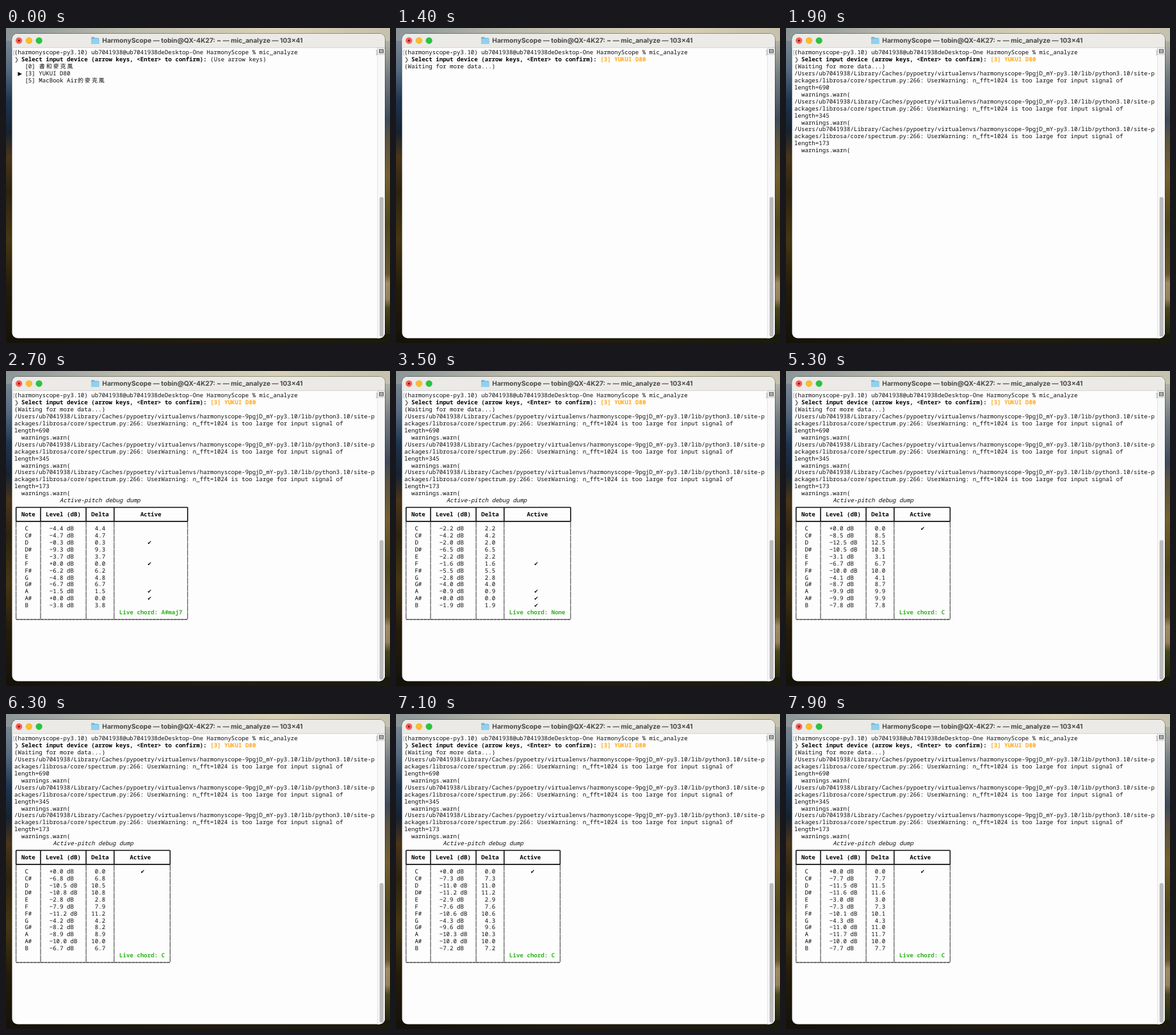
These frames come from a looping animation (600 px wide and 492 px high, 8000 ms). An HTML page:

```html
<!DOCTYPE html>
<html lang="en">
<head>
<meta charset="utf-8">
<title>Terminal: mic_analyze</title>
<style>
  html, body { margin: 0; width: 100%; height: 100%; overflow: hidden; background: #17140c; }
  svg { display: block; width: 600px; height: 492px; }
  text { white-space: pre; text-rendering: geometricPrecision; }
  #screen text { font: 500 9.117px "Noto Sans Mono", "DejaVu Sans Mono", monospace; fill: #0c0c0c; }
  #screen .bold { font-weight: 700; fill: #000; }
  #screen .italic { font-style: italic; }
  #screen .faint { fill: #6e6e6e; }
  #screen .mark { fill: #9a9a9a; font-weight: 400; }
  #screen .answer { font-weight: 700; fill: #ffa81c; }
  #screen .chord { font-weight: 700; fill: #2fb41d; }
  #screen .cjk { font: 500 9px "Noto Sans CJK TC", "Noto Sans CJK", sans-serif; letter-spacing: 1.94px; }
  #screen .symbol { font: 8.5px "DejaVu Sans", sans-serif; }
  .title { font: 700 10.2px Inter, sans-serif; fill: #484846; text-anchor: middle; }
  .thin { stroke: #333; stroke-width: 1; stroke-dasharray: 10.3 .64; }
  .rule { stroke: #222; stroke-width: 1.1; stroke-dasharray: 5 .47; }
  .heavy { stroke: #111; stroke-width: 1.6; }
</style>
</head>
<body>
<svg viewBox="0 0 600 492">
  <defs>
    <linearGradient id="sky">
      <stop stop-color="#8c9698"/><stop offset=".3" stop-color="#b9b9ab"/>
      <stop offset=".7" stop-color="#d8d1b7"/><stop offset="1" stop-color="#c6c1ad"/>
    </linearGradient>
    <linearGradient id="left" x2="0" y2="1">
      <stop stop-color="#87939a"/><stop offset=".13" stop-color="#576b80"/>
      <stop offset=".23" stop-color="#1f3550"/><stop offset=".33" stop-color="#172230"/>
      <stop offset=".41" stop-color="#49351a"/><stop offset=".52" stop-color="#2c2310"/>
      <stop offset=".67" stop-color="#463712"/><stop offset=".82" stop-color="#241c0b"/>
      <stop offset="1" stop-color="#15120a"/>
    </linearGradient>
    <linearGradient id="right" x2="0" y2="1">
      <stop stop-color="#c9c6b3"/><stop offset=".15" stop-color="#737d82"/>
      <stop offset=".29" stop-color="#3d4a5b"/><stop offset=".35" stop-color="#5a5340"/>
      <stop offset=".47" stop-color="#75602d"/><stop offset=".62" stop-color="#50461a"/>
      <stop offset=".78" stop-color="#66562a"/><stop offset=".81" stop-color="#a08a62"/>
      <stop offset=".86" stop-color="#97815a"/><stop offset=".89" stop-color="#484719"/>
      <stop offset="1" stop-color="#1a1a0d"/>
    </linearGradient>
    <linearGradient id="ground">
      <stop stop-color="#15120a"/><stop offset=".5" stop-color="#211b0e"/>
      <stop offset="1" stop-color="#1a1a0d"/>
    </linearGradient>
    <clipPath id="frame"><rect x="9.5" y="9" width="582.5" height="475.5" rx="8.5"/></clipPath>
  </defs>

  <rect width="300" height="492" fill="url(#left)"/>
  <rect x="300" width="300" height="492" fill="url(#right)"/>
  <rect width="600" height="20" fill="url(#sky)"/>
  <rect y="478" width="600" height="14" fill="url(#ground)"/>
  <rect x="9" y="8.5" width="583.5" height="476.5" rx="9" fill="none" stroke="#000" stroke-opacity=".3"/>

  <g clip-path="url(#frame)">
    <rect x="9" y="9" width="584" height="476" fill="#fdfdfd"/>
    <rect x="9" y="9" width="584" height="22" fill="#ebeae6"/>
    <path d="M9 30.7H593" stroke="#d2d1cd" stroke-width=".8"/>
    <rect x="580.5" y="31" width="12" height="454" fill="#f8f8f8"/>
    <path d="M580.5 31V485" stroke="#e4e4e4"/>
    <rect x="583.7" y="264" width="6.2" height="218" rx="3.1" fill="#bcbcbc"/>
    <rect x="581" y="31" width="11" height="10.5" fill="#f4f4f4" stroke="#c4c4c4" stroke-width=".7"/>
    <rect x="583.5" y="33.5" width="6" height="5.5" fill="none" stroke="#444" stroke-width=".9"/>
    <path d="M584 35.3H589M584 37.2H589" stroke="#444" stroke-width=".8"/>
  </g>

  <g stroke-width=".5">
    <circle cx="20.2" cy="19.7" r="4.8" fill="#fe5f57" stroke="#df4740"/>
    <circle cx="35.9" cy="19.7" r="4.8" fill="#febc2e" stroke="#dda023"/>
    <circle cx="51.6" cy="19.7" r="4.8" fill="#29c53f" stroke="#1fa630"/>
    <circle cx="20.2" cy="19.7" r="1.6" fill="#7d1511"/>
  </g>
  <path d="M133 15.5q0-1.5 1.5-1.5h3l1.5 1.4h5q1.5 0 1.5 1.5v6.6q0 1.5-1.5 1.5h-9.5q-1.5 0-1.5-1.5z" fill="#6fb8dd"/>
  <rect x="133" y="16.8" width="12.5" height="8.2" rx="1.4" fill="#92d0ee"/>
  <text class="title" x="307" y="23.3">HarmonyScope — tobin@QX-4K27: ~ — mic_analyze — 103×41</text>
  <g id="screen"></g>
</svg>

<script>
const LOOP = 8000, CELL = 5.47, LINE = 10.94, LEFT = 13, TOP = 38;
const ANSWERED = 600, WAITING = 900, WARNED = 1900, LISTENING = 2100;
const USER = "ub7041938";
const NOTES = ["C", "C#", "D", "D#", "E", "F", "F#", "G", "G#", "A", "A#", "B"];
const ACTIVE_LIMIT = 2;
const readings = [
  { at: 2700, chord: "A#maj7", drop: [4.4, 4.7, .3, 9.3, 3.7, 0, 6.2, 4.8, 6.7, 1.5, 0, 3.8] },
  { at: 4300, chord: "None", drop: [0, 3.7, 3.8, 3.7, .7, 3.2, 4.8, .8, 1.4, .4, 0, 0] },
  { at: 5300, chord: "C", drop: [0, 8.5, 12.5, 10.5, 3.1, 6.7, 10, 4.1, 8.7, 9.9, 9.9, 7.8] },
  { at: 6300, chord: "C", drop: [0, 6.8, 10.5, 10.8, 2.8, 7.9, 11.2, 4.2, 8.2, 8.9, 10, 6.7] },
  { at: 7900, chord: "C", drop: [0, 7.7, 11.5, 11.6, 3, 7.3, 10.1, 4.3, 11, 11.7, 10, 7.7] },
];

const screen = document.getElementById("screen");
const colX = col => LEFT + col * CELL;
const rowY = row => TOP + row * LINE;
const escapeText = s => s.replace(/&/g, "&amp;").replace(/</g, "&lt;");
const put = (col, row, text, style = "") =>
  `<text class="${style}" x="${colX(col)}" y="${rowY(row) + 3.1}">${escapeText(text)}</text>`;
const line = (x1, y1, x2, y2, style) =>
  `<path class="${style}" d="M${x1} ${y1}L${x2} ${y2}"/>`;
const centred = (col, width, row, text, style) =>
  put(col + Math.floor((width - text.length) / 2), row, text, style);

function prompt() {
  return put(-.65, 0, "[", "mark") + put(103, 0, "]", "mark") +
    put(0, 0, `(harmonyscope-py3.10) ${USER}@${USER}deDesktop-One HarmonyScope % mic_analyze`) +
    put(0, 1, "❯", "faint symbol") +
    put(2, 1, "Select input device (arrow keys, <Enter> to confirm):", "bold");
}

function menu() {
  return put(56, 1, "(Use arrow keys)") +
    put(3, 2, "[0]") + put(7.1, 2, "書和麥克風", "cjk") +
    put(1, 3, "▶", "symbol") + put(3, 3, "[3] YUKUI D80") +
    put(3, 4, "[5] MacBook Air") + put(18.1, 4, "的麥克風", "cjk");
}

function warnings() {
  return [690, 345, 173].map((length, i) => [
    `/Users/${USER}/Library/Caches/pypoetry/virtualenvs/harmonyscope-9pgjD_mY-py3.10/lib/python3.10/site-p`,
    "ackages/librosa/core/spectrum.py:266: UserWarning: n_fft=1024 is too large for input signal of",
    `length=${length}`,
    "  warnings.warn(",
  ].map((text, j) => put(0, 3 + i * 4 + j, text)).join("")).join("");
}

// Blends neighbouring readings, keeping the loudest note at 0 dB.
function listen(time) {
  const next = readings.findIndex(r => r.at >= time);
  if (next === 0) return readings[0];
  const a = readings[next - 1], b = readings[next];
  const mix = (time - a.at) / (b.at - a.at);
  const blend = a.drop.map((d, i) => d + (b.drop[i] - d) * mix);
  const loudest = Math.min(...blend);
  return { chord: (mix < .5 ? a : b).chord, drop: blend.map(d => d - loudest) };
}

function table({ chord, drop }) {
  const live = `Live chord: ${chord}`;
  const widths = [4, 10, 5, live.length];
  const starts = [2, 9, 22, 30];
  const edges = [0, 7, 20, 28, 31 + live.length];
  const [top, head, bottom] = [16, 18, 32].map(rowY);
  const x1 = colX(.5), x2 = colX(edges[4] + .5);
  const cell = (i, row, text, style) => centred(starts[i], widths[i], row, text, style);

  let out = centred(0, edges[4] + 1, 15, "Active-pitch debug dump", "italic");
  out += line(x1, top, x2, top, "heavy") + line(x1, head, x2, head, "heavy") +
    line(x1, bottom, x2, bottom, "rule");
  for (const edge of edges) {
    const x = colX(edge + .5);
    out += line(x, top, x, head, "heavy") + line(x, head, x, bottom, "thin");
  }
  ["Note", "Level (dB)", "Delta", "Active"].forEach((name, i) => out += cell(i, 17, name, "bold"));
  NOTES.forEach((note, i) => {
    const row = 19 + i, delta = drop[i].toFixed(1);
    out += cell(0, row, note) +
      cell(1, row, `${delta === "0.0" ? "+" : "−"}${delta} dB`) +
      cell(2, row, delta);
    if (drop[i] < ACTIVE_LIMIT) out += cell(3, row, "✔", "symbol");
  });
  return out + cell(3, 31, live, "chord");
}

function draw(time) {
  let out = prompt();
  if (time < ANSWERED) return out + menu();
  out += put(56, 1, "[3] YUKUI D80", "answer");
  if (time >= WAITING) out += put(0, 2, "(Waiting for more data...)");
  if (time >= WARNED) out += warnings();
  if (time >= LISTENING) out += table(listen(time));
  return out;
}

let shown = -1;
function tick() {
  const step = Math.floor((performance.now() % LOOP + 100) / 200);
  if (step !== shown) {
    shown = step;
    screen.innerHTML = draw(Math.max(0, step * 200 - 100));
  }
  requestAnimationFrame(tick);
}
tick();
</script>
</body>
</html>
```
